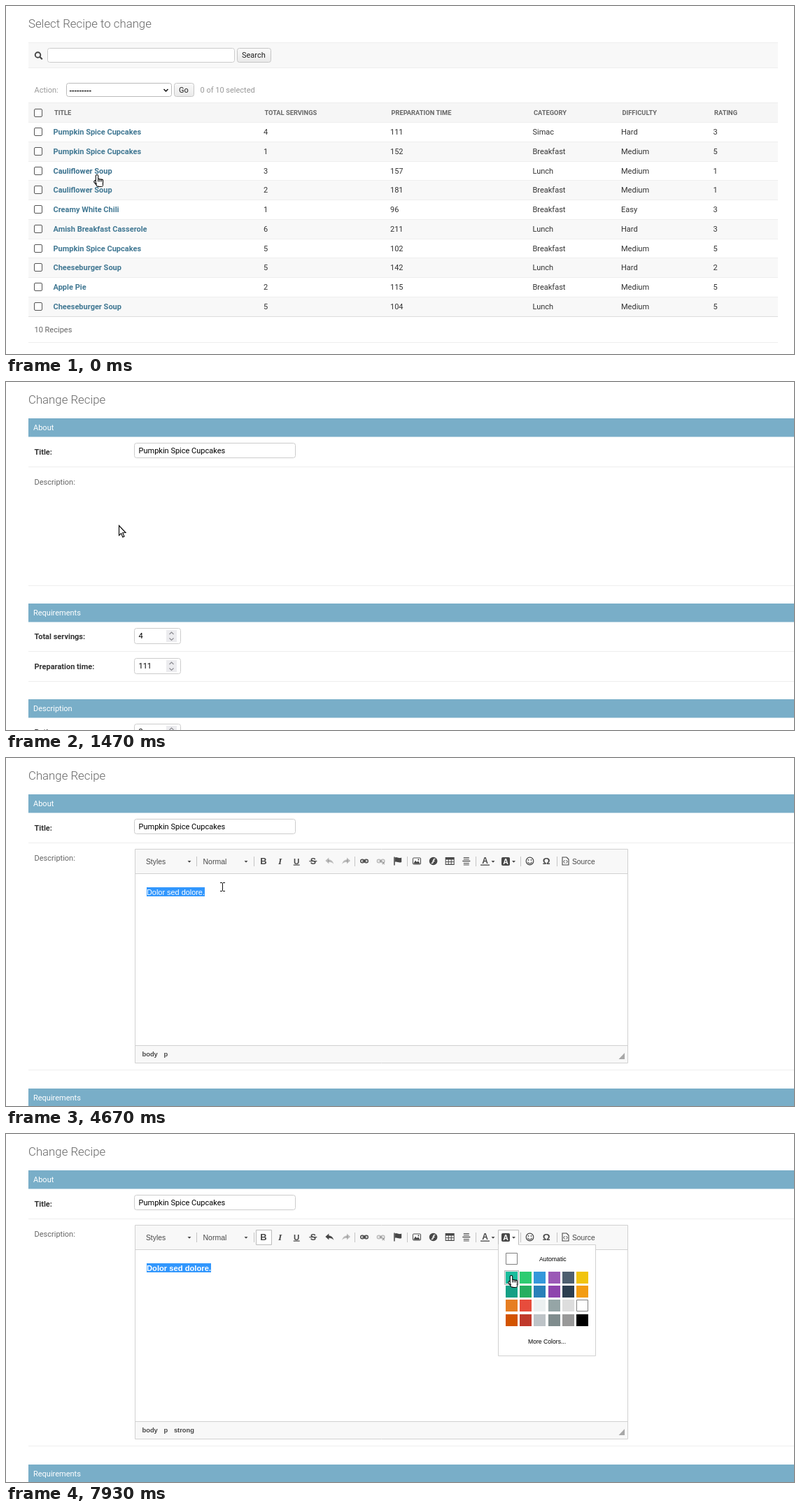
These frames come from a looping animation (1126 px wide and 498 px high, 8000 ms). An HTML page with a canvas:

```html
<!DOCTYPE html>
<html lang="en">
<head>
<meta charset="utf-8">
<title>Recipe admin</title>
<style>
html, body { margin: 0; width: 100%; height: 100%; overflow: hidden; background: #fff; }
canvas { display: block; }
</style>
</head>
<body>
<canvas id="stage" width="1126" height="498"></canvas>
<script>
const ctx = document.getElementById('stage').getContext('2d');
const LOOP = 8000;
const SIZE = 11;
const ROBOTO = 'Roboto, sans-serif';
const ARIAL = '"Liberation Sans", Arial, sans-serif';
const INK = '#484848', RULE = '#eee', EDGE = '#d1d1d1';

// Moments (ms) at which the page changes
const OPEN = 1270, EDITOR = 1530, CONTENT = 1600, FOCUS = 3530, SELECTED = 3670;
const BOLD = 5930, PANEL = 7000, BLUR = 7930;

const COLUMNS = { 'TITLE': 67.5, 'TOTAL SERVINGS': 368, 'PREPARATION TIME': 549,
  'CATEGORY': 752.5, 'DIFFICULTY': 879, 'RATING': 1010.5 };
const ROWS = `Pumpkin Spice Cupcakes|4|111|Simac|Hard|3
Pumpkin Spice Cupcakes|1|152|Breakfast|Medium|5
Cauliflower Soup|3|157|Lunch|Medium|1
Cauliflower Soup|2|181|Breakfast|Medium|1
Creamy White Chili|1|96|Breakfast|Easy|3
Amish Breakfast Casserole|6|211|Lunch|Hard|3
Pumpkin Spice Cupcakes|5|102|Breakfast|Medium|5
Cheeseburger Soup|5|142|Lunch|Hard|2
Apple Pie|2|115|Breakfast|Medium|5
Cheeseburger Soup|5|104|Lunch|Medium|5`.split('\n').map(r => r.split('|'));

const SWATCHES = ('1abc9c 2ecc71 3498db 9b59b6 4e5f70 f1c40f 16a085 27ae60 2980b9 8e44ad 2c3e50 f39c12 ' +
  'e67e22 e74c3c ecf0f1 95a5a6 dddddd ffffff d35400 c0392b bdc3c7 7f8c8d 999999 000000').split(' ');

// Pointer moves: start, end, x, y
const MOVES = [
  [0, 600, 126, 181], [600, 800, 127, 195], [870, 1070, 129, 183],
  [1270, 1470, 161, 205], [1470, 1600, 172, 229],
  [1870, 2400, 346, 194], [2400, 2600, 277, 175], [2670, 2800, 313, 194],
  [3470, SELECTED, 122, 188], [3930, 4530, 306, 176], [4600, 4670, 309, 184],
  [4670, 5130, 565, 186], [5130, 5470, 376, 154], [5470, 5730, 370, 146],
  [5870, 6070, 617, 173], [6070, 6800, 717, 145], [6930, 7530, 722, 202]
];

function pointerAt(t) {
  let x = 130, y = 241;
  for (const [start, end, toX, toY] of MOVES) {
    const p = Math.min(Math.max((t - start) / (end - start), 0), 1);
    const ease = p * p * (3 - 2 * p);
    x += (toX - x) * ease;
    y += (toY - y) * ease;
  }
  return { x: Math.round(x), y: Math.round(y) };
}

/* ---------- helpers ---------- */

const inside = (p, x, y, w, h) => p.x >= x && p.x < x + w && p.y >= y && p.y < y + h;

function rect(x, y, w, h, color) {
  ctx.fillStyle = color;
  ctx.fillRect(x, y, w, h);
}

function box(x, y, w, h, border, fill, r = 0) {
  ctx.beginPath();
  ctx.roundRect(x + .5, y + .5, w - 1, h - 1, r);
  if (fill) { ctx.fillStyle = fill; ctx.fill(); }
  ctx.strokeStyle = border;
  ctx.lineWidth = 1;
  ctx.stroke();
}

function text(s, x, y, color = '#333', weight = 400, size = SIZE, family = ROBOTO) {
  ctx.font = `${weight} ${size}px ${family}`;
  ctx.fillStyle = color;
  ctx.fillText(s, x, y);
}

const label = (s, x, y, size = 10.3) => text(s, x, y, INK, 400, size, ARIAL);

function trace(points) {
  ctx.beginPath();
  for (let i = 0; i < points.length; i += 2) ctx.lineTo(points[i], points[i + 1]);
}

function line(points, color = INK, width = 1) {
  trace(points);
  ctx.strokeStyle = color;
  ctx.lineWidth = width;
  ctx.stroke();
}

function shape(points, color = INK) {
  trace(points);
  ctx.fillStyle = color;
  ctx.fill();
}

function ring(x, y, r, color, width, from = 0, to = 2 * Math.PI) {
  ctx.beginPath();
  ctx.arc(x, y, r, from, to);
  ctx.strokeStyle = color;
  ctx.lineWidth = width;
  ctx.stroke();
}

function dot(x, y, r, color = INK) {
  ctx.beginPath();
  ctx.arc(x, y, r, 0, 2 * Math.PI);
  ctx.fillStyle = color;
  ctx.fill();
}

const chevron = (x, y, r, dir, color, width) => line([x - r, y - r * dir / 2, x, y + r * dir / 2, x + r, y - r * dir / 2], color, width);

// Runs a drawing with the origin moved to x, y
function at(x, y, draw, alpha = 1) {
  ctx.save();
  ctx.translate(x, y);
  ctx.globalAlpha = alpha;
  draw();
  ctx.restore();
}

function button(name, x, y, w, h) {
  const g = ctx.createLinearGradient(0, y, 0, y + h);
  g.addColorStop(0, '#fafafa');
  g.addColorStop(1, '#e9e9e9');
  box(x, y, w, h, '#c6c6c6', g, 3);
  text(name, x + 7, y + 14, '#222');
}

/* ---------- list page ---------- */

const rowMiddle = i => 180 + i * 27.78;

function hoveredRow(p) {
  ctx.font = `700 ${SIZE}px ${ROBOTO}`;
  return ROWS.findIndex((r, i) => inside(p, 67, rowMiddle(i) - 6.6, ctx.measureText(r[0]).width, 13.2));
}

function band(y, h, fill) {
  rect(32, y, 1071, h, fill);
  rect(32, y, 1071, 1, RULE);
  rect(32, y + h - 1, 1071, 1, RULE);
}

function drawList(hovered) {
  const xs = Object.values(COLUMNS);
  const check = y => box(40, Math.round(y) - 6, 12, 12, '#555', '#fff', 1.5);

  text('Select Recipe to change', 32, 31, '#666', 300, 16.8);
  band(52, 37, '#f8f8f8');
  ring(45.5, 70, 3.8, '#444', 1.9);
  line([48.3, 72.8, 51.8, 76.3], '#444', 2.2);
  box(59, 60, 268, 21, '#ccc', '#fff', 3);
  button('Search', 330, 60, 49, 21);

  text('Action:', 40.5, 124, '#999');
  box(86, 110, 151, 20, '#bbb', '#fff', 3);
  text('-'.repeat(9), 90.5, 124, '#000', 700, 10.5, ARIAL);
  chevron(228.5, 120.5, 3, 1, '#111', 1.5);
  button('Go', 240, 110, 29, 20);
  text('0 of 10 selected', 277.5, 124, '#999');

  band(138, 29, '#f6f6f6');
  check(152.6);
  for (const name in COLUMNS) text(name, COLUMNS[name] + 1.5, 156, '#666', 700, 9.3);

  ROWS.forEach((row, i) => {
    const y = rowMiddle(i), top = Math.round(y - 14);
    if (i % 2) rect(32, top, 1071, 28, '#f8f8f8');
    if (i) rect(32, top, 1071, 1, RULE);
    check(y);
    row.forEach((cell, c) => {
      const link = i === hovered ? '#3b728f' : '#417893';
      text(cell, xs[c], Math.round(y) + 4, c ? '#333' : link, c ? 400 : 700);
    });
  });
  rect(32, 444, 1071, 1, '#ddd');
  text('10 Recipes', 40.5, 467, '#666');
  rect(32, 481, 1071, 1, RULE);
}

/* ---------- form page ---------- */

function bar(name, y) {
  rect(32, y, 1094, 26.5, '#79aec8');
  text(name, 39, y + 17, '#fff');
}

function numberField(name, value, y) {
  text(name, 40.5, y + 16, '#333', 700);
  box(183, y, 67, 23, '#ccc', '#fff', 3);
  text(value, 189.5, y + 15, '#000');
  rect(229, y + 3, 15, 17, '#ececef');
  chevron(236.5, y + 7.5, 3, -1, '#8a8a90', 1.1);
  chevron(236.5, y + 16, 3, 1, '#8a8a90', 1.1);
  rect(32, y + 33, 1094, 1, RULE);
}

function drawForm(editor) {
  text('Change Recipe', 32, 31, '#666', 300, 16.8);
  bar('About', 52);
  text('Title:', 40.5, 104, '#333', 700);
  box(183, 87, 231, 22, '#ccc', '#fff', 3);
  text('Pumpkin Spice Cupcakes', 189.5, 102, '#000');
  rect(32, 121, 1094, 1, RULE);
  text('Description:', 40.5, 147, '#666');

  const end = editor ? 446 : 291;
  rect(32, end, 1094, 1, RULE);
  bar('Requirements', end + (editor ? 27 : 26));
  if (editor) return;
  numberField('Total servings:', '4', 352);
  numberField('Preparation time:', '111', 395);
  bar('Description', 454);
  numberField('Rating:', '3', 489);
}

/* ---------- editor toolbar ---------- */

function glyph(s, size, style = '700', family = ARIAL, color = INK) {
  ctx.textAlign = 'center';
  text(s, 0, 4.5, color, style, size, family);
}

function linkIcon() {
  ctx.strokeStyle = INK;
  ctx.lineWidth = 1.5;
  for (const x of [-5.2, .4]) {
    ctx.beginPath();
    ctx.roundRect(x, -2.3, 4.8, 4.6, 2);
    ctx.stroke();
  }
  line([-3, 0, 3, 0], INK, 1.4);
}

function undoIcon() {
  shape([-6, -.5, -1, -5, -1, 4]);
  ctx.beginPath();
  ctx.moveTo(-2, -2.3);
  ctx.quadraticCurveTo(4.5, -2, 6, 4.5);
  ctx.quadraticCurveTo(3.5, 1.2, -2, 1.3);
  ctx.fill();
}

const ICONS = {
  bold() { glyph('B', 13); },
  italic() { glyph('I', 13.5, 'italic 700', '"Liberation Serif", serif'); },
  underline() { glyph('U', 11.5); rect(-4.5, 5, 9, 1.2, INK); },
  strike() { glyph('S', 12.5); rect(-5.5, -.5, 11, 1.2, INK); },
  undo: undoIcon,
  redo() { ctx.scale(-1, 1); undoIcon(); },
  link: linkIcon,
  unlink() {
    linkIcon();
    rect(1.5, .5, 6, 5, '#f8f8f8');
    line([2, 1, 5.5, 4.8], INK, 1.3);
    line([5.5, 1, 2, 4.8], INK, 1.3);
  },
  flag() {
    rect(-5, -6, 1.5, 12, INK);
    ctx.beginPath();
    ctx.moveTo(-3.5, -5);
    ctx.bezierCurveTo(-1, -7, 2, -3, 6, -5);
    ctx.lineTo(6, 1.5);
    ctx.bezierCurveTo(2, 3.5, -1, -.2, -3.5, 1.6);
    ctx.fill();
  },
  image() {
    box(-6, -5, 12, 10, INK, '#fff', 1);
    shape([-5, 4, -2, -1, 0, 1.6, 2, 0, 5, 4]);
    dot(2.5, -2, 1.1);
  },
  flash() {
    dot(0, 0, 5.8);
    line([2.8, -3.2, .8, -2.6, -.8, 2.4, -2.8, 3.2], '#fff', 1.4);
    line([-1.2, 0, 2, 0], '#fff', 1.2);
  },
  table() {
    rect(-6.5, -5.5, 13, 11, INK);
    for (let i = 0; i < 6; i++) rect(-5.5 + i % 3 * 4, i < 3 ? -2 : 1.6, 3, 2.6, '#fff');
  },
  rule() {
    rect(-5.5, -.7, 11, 1.4, INK);
    for (const y of [-5.5, -3.2, 2.6, 4.9]) rect(-4, y, 8, 1, INK);
  },
  smiley() {
    ring(0, 0, 5.3, INK, 1.2);
    for (const x of [-2, 2]) dot(x, -1.6, .9);
    ring(0, .4, 3, INK, 1.1, .25, Math.PI - .25);
  },
  symbol() { glyph('Ω', 13.5); }
};

// First icon centre of each group; icons follow at a fixed pitch
const GROUPS = [
  [368, 'bold italic underline strike undo redo'],
  [512, 'link unlink flag'],
  [587, 'image flash table rule'],
  [748.5, 'smiley symbol']
];
const PITCH = 23.6;

function drawToolbar(t, p) {
  const bold = t >= BOLD, open = t >= PANEL;
  const separator = x => rect(Math.round(x), 141, 1, 14, '#c4c4c4');
  const caret = x => shape([x - 2.5, 147, x + 2.5, 147, x, 149.8]);
  const frame = (x, w, on) => {
    if (on || inside(p, x, 137, w, 21)) box(x, 137, w, 22, '#bcbcbc', on ? '#fff' : '#e5e5e5');
  };

  label('Styles', 200, 151.5);
  label(t >= FOCUS ? 'Normal' : 'Format', 281.5, 151.5, 10.5);

  for (const [start, names] of GROUPS) {
    separator(start - 14);
    names.split(' ').forEach((name, i) => {
      const x = start + i * PITCH;
      const disabled = name === 'redo' || name === 'unlink' || (name === 'undo' && !bold);
      if (!disabled) frame(Math.round(x) - 11, 23, name === 'bold' && bold);
      at(x, 147.5, ICONS[name], disabled ? .35 : 1);
    });
  }

  frame(674, 29);
  frame(703, 30, open);
  at(684.5, 146.5, () => { glyph('A', 12); rect(-6.5, 6, 13, 1.3, INK); });
  box(708, 142, 12, 12, INK, INK, 1);
  at(714, 147.3, () => glyph('A', 10.5, '700', ARIAL, '#fff'));

  frame(790, 57);
  at(799.5, 147.5, () => {
    line([1.5, -5.5, -4.5, -5.5, -4.5, 5.5, 4.5, 5.5, 4.5, -2.5, 1.5, -5.5], INK, 1.1);
    for (const s of [-1, 1]) line([s, -1.5, s * 2.8, .8, s, 3]);
  });
  label('Source', 809, 151.5);
  [272, 671, 787].forEach(separator);
  [262, 343, 696, 725.5].forEach(caret);
}

/* ---------- editor ---------- */

function drawContent(t, p) {
  const bold = t >= BOLD, left = 201;
  const words = color => text('Dolor sed dolore.', left, 195.5, color, bold ? 700 : 400, bold ? 11.2 : 10.9, ARIAL);
  words('#333');
  if (t < FOCUS) return;
  const right = left + Math.round(ctx.measureText('Dolor sed dolore.').width);
  const from = t < SELECTED ? Math.max(left, p.x) : left;
  ctx.save();
  ctx.beginPath();
  ctx.rect(from, 185, Math.max(right - from, 0), 13);
  ctx.clip();
  rect(left, 185, right - left, 13, '#3297fd');
  words('#fff');
  ctx.restore();
}

function drawEditor(t, p) {
  box(184, 130, 705, 307, EDGE, '#fff');
  rect(185, 131, 703, 34, '#f8f8f8');
  rect(185, 165, 703, 1, EDGE);
  rect(185, 411, 703, 25, '#f8f8f8');
  rect(185, 411, 703, 1, EDGE);
  shape([884, 422, 884, 431, 875.5, 431], '#a8a8a8');
  drawToolbar(t, p);
  if (t >= CONTENT) drawContent(t, p);

  const trail = t >= BOLD ? ['body', 'p', 'strong'] : t >= FOCUS ? ['body', 'p'] : [];
  let x = 194.5;
  for (const tag of trail) {
    text(tag, x, 427, INK, 700, 9.35, ARIAL);
    x += ctx.measureText(tag).width + 8.7;
  }
}

/* ---------- colour panel ---------- */

const swatchAt = i => [714 + Math.round(i % 6 * 20.2), 197 + Math.round(Math.floor(i / 6) * 20.2)];
const overPanel = p => inside(p, 703, 158, 140, 160);
const overAuto = p => inside(p, 712, 167, 123, 24);
const hoveredSwatch = p => SWATCHES.findIndex((color, i) => {
  const [x, y] = swatchAt(i);
  return inside(p, x - 2, y - 2, 20, 20);
});

function drawPanel(t, p) {
  box(703, 158, 140, 160, EDGE, '#fff');
  rect(704, 158, 28, 1, '#fff');
  if (t < BLUR) box(712, 167, 123, 24, '#b6b6b6', '#e5e5e5');
  box(714, 170, 17, 17, '#808080', '#fff');
  text('Automatic', 762, 182, '#000', 400, 8.7, ARIAL);
  const hovered = hoveredSwatch(p);
  SWATCHES.forEach((color, i) => {
    const [x, y] = swatchAt(i);
    if (i === hovered) box(x - 2, y - 2, 21, 21, '#b6b6b6', '#e5e5e5');
    rect(x, y, 17, 17, '#' + color);
    if (color === 'ffffff') box(x, y, 17, 17, '#808080');
  });
  text('More Colors...', 746, 300, '#000', 400, 8.65, ARIAL);
}

/* ---------- pointer ---------- */

function limb(x0, y0, x1, y1) {
  ctx.lineCap = 'round';
  line([x0, y0, x1, y1], '#000', 4.4);
  line([x0, y0, x1, y1], '#fff', 2.3);
}

const POINTERS = {
  arrow() {
    trace([.5, .5, .5, 14.5, 3.6, 11.6, 5.8, 17, 8, 16, 5.7, 10.8, 10, 10.6]);
    ctx.closePath();
    ctx.fillStyle = '#fff';
    ctx.fill();
    ctx.strokeStyle = '#000';
    ctx.lineWidth = 1.1;
    ctx.stroke();
  },
  hand() {
    box(-1, 10, 10, 8, '#000', '#fff', 2);
    limb(-2.6, 10.4, 1, 15);
    for (let i = 3; i >= 0; i--) limb(i * 2.3, i ? 7.6 + i * .4 : 2.2, i * 2.3, 12);
    rect(0, 10.5, 7.8, 6, '#fff');
  },
  beam() {
    rect(0, -5, 1, 11, '#111');
    for (const y of [-6, 6]) for (const x of [-3, 1]) rect(x, y, 3, 1, '#111');
  }
};

function pointerKind(t, p, row) {
  if (t < OPEN) return row < 0 ? 'arrow' : 'hand';
  if (t >= PANEL && overPanel(p)) return overAuto(p) || hoveredSwatch(p) >= 0 ? 'hand' : 'arrow';
  const dragging = t >= FOCUS && t < 4600;
  return dragging || (t >= EDITOR && inside(p, 185, 166, 703, 245)) ? 'beam' : 'arrow';
}

function draw(t) {
  const p = pointerAt(t);
  const row = t < OPEN ? hoveredRow(p) : -1;
  rect(0, 0, 1126, 498, '#fff');
  if (t < OPEN) drawList(row);
  else drawForm(t >= EDITOR);
  if (t >= EDITOR) drawEditor(t, p);
  if (t >= PANEL) drawPanel(t, p);
  at(p.x, p.y, POINTERS[pointerKind(t, p, row)]);
}

// Advances 15 times per second, on times rounded to 10 ms
function tick() {
  const step = Math.floor((performance.now() % LOOP) * .015 + .06);
  draw(Math.round(step * 20 / 3) * 10 % LOOP);
  requestAnimationFrame(tick);
}
tick();
</script>
</body>
</html>
```
